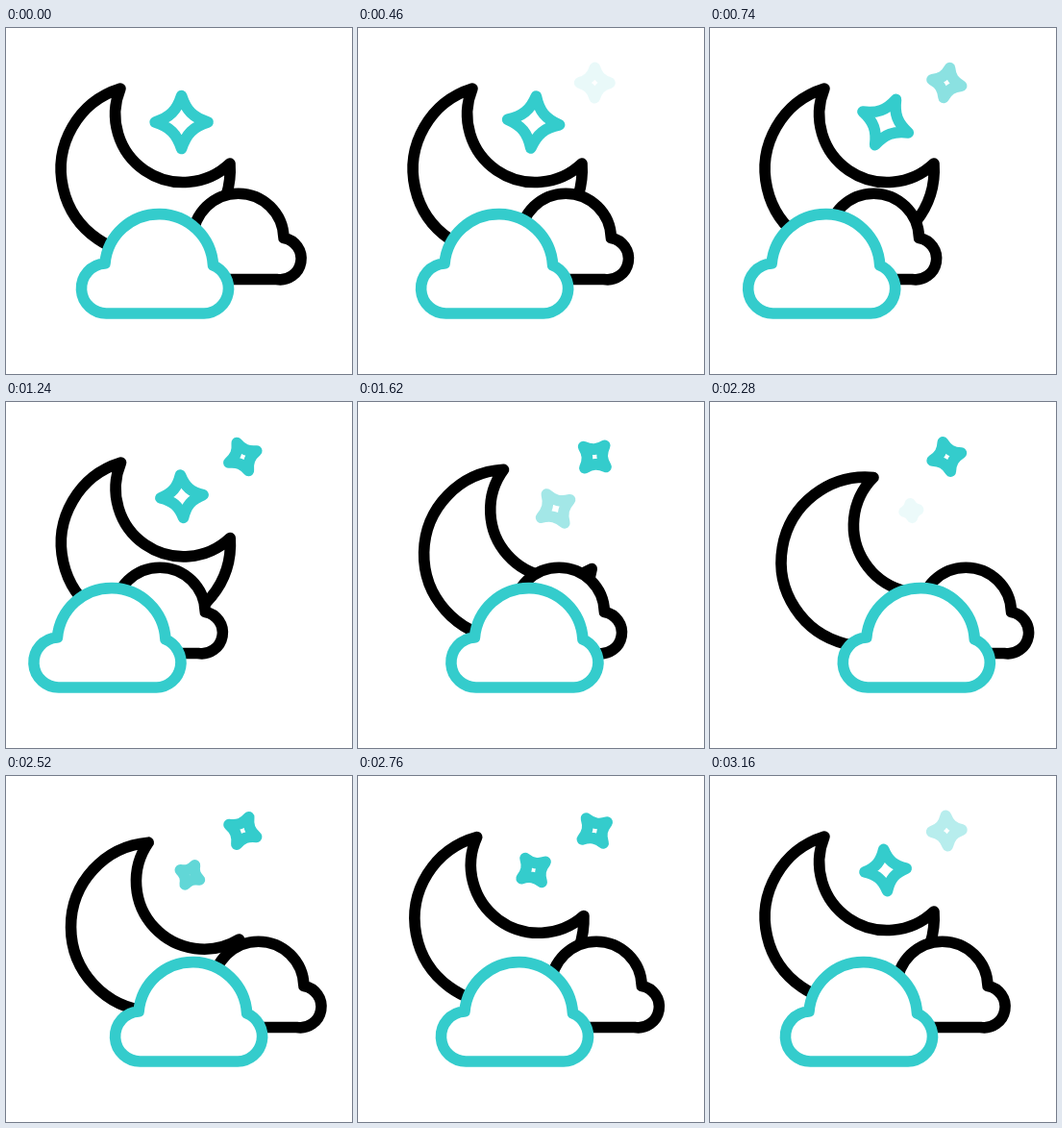
Write an HTML page that moves like this. It is 360 by 360 pixels and loops after 3.18 s.

```html
<!DOCTYPE html>
<html lang="en">
<head>
<meta charset="utf-8">
<title>Cloudy night</title>
<style>
  html, body { margin: 0; width: 100%; height: 100%; overflow: hidden; background: #fff; }
  svg { display: block; width: 100vw; height: 100vh; }
  path { fill: #fff; stroke: #000; stroke-width: 11.6; stroke-linejoin: round; }
  .teal { stroke: #34cccc; }
  .star { fill: none; vector-effect: non-scaling-stroke; }
</style>
</head>
<body>
<svg viewBox="0 0 360 360">
  <path id="moon" d="M119 63A88 88 0 1 0 233 141A70.6 70.6 0 0 1 119 63Z"/>
  <path id="big" class="teal star"/>
  <path id="small" class="teal star"/>
  <path id="back" d="M202 261.5H281.5A21.5 21.5 0 0 0 289 218.5A47.26 47.26 0 0 0 194.5 218.5A21.5 21.5 0 0 0 202 261.5Z"/>
  <path id="front" class="teal" d="M106 297H206A26 26 0 0 0 215.5 247A56.4 56.4 0 0 0 103 245A26 26 0 0 0 106 297Z"/>
</svg>
<script>
const LOOP = 3180;
const [moon, big, small, back, front] =
  ['moon', 'big', 'small', 'back', 'front'].map(id => document.getElementById(id));

const STAR = 'M0-27.5C5-12 12-5 27.5 0C12 5 5 12 0 27.5C-5 12-12 5-27.5 0C-12-5-5-12 0-27.5Z';
for (const star of [big, small]) star.setAttribute('d', STAR);

// Progress from 0 to 1 between two times: even, eased at both ends.
const ramp = (t, from, to) => Math.min(1, Math.max(0, (t - from) / (to - from)));
const ease = (t, from, to) => {
  const x = ramp(t, from, to);
  return x * x * (3 - 2 * x);
};
const spin = (t, from, to) => 180 * (1 - Math.cos(Math.PI * ramp(t, from, to)));

const move = (el, value) => el.setAttribute('transform', value);

function placeStar(el, x, y, turn, size, fade) {
  move(el, `translate(${x} ${y}) rotate(${turn}) scale(${size})`);
  el.setAttribute('opacity', fade);
}

function draw(t) {
  // Clouds drift left, swing right, then settle back.
  const frontX = -51 * ease(t, 200, 992) + 115 * ease(t, 1190, 1945) - 64 * ease(t, 2160, 2930);
  const backX = -82.5 * ease(t, 200, 901) + 107 * ease(t, 1195, 2085) - 24.5 * ease(t, 2385, 2945);
  move(front, `translate(${frontX} 0)`);
  move(back, `translate(${backX} 0)`);

  const tilt = 23.8 * (ease(t, 1195, 1955) - ease(t, 2180, 2885));
  move(moon, `rotate(${tilt} 105.5 199)`);

  // The big star shrinks away to the right and grows back at home.
  const shift = ease(t, 1195, 1955) - ease(t, 2000, 2750);
  const size = 1 - 0.75 * ramp(t, 200, 2250) ** 2 + 0.55 * ramp(t, 2250, LOOP);
  const bigFade = 1 - ramp(t, 1400, 1800) + ramp(t, 2250, 2600);
  placeStar(big, 182.6 + 39 * shift, 98 + 22 * shift, spin(t, 200, 3400), size, bigFade);

  const smallFade = ramp(t, 400, 1000) - ramp(t, 2760, 3375);
  placeStar(small, 246.3, 57, spin(t, 400, 3350), 0.57, smallFade);
}

let start;
function tick(now) {
  start ??= now;
  draw((now - start) % LOOP);
  requestAnimationFrame(tick);
}
draw(0);
requestAnimationFrame(tick);
</script>
</body>
</html>
```
